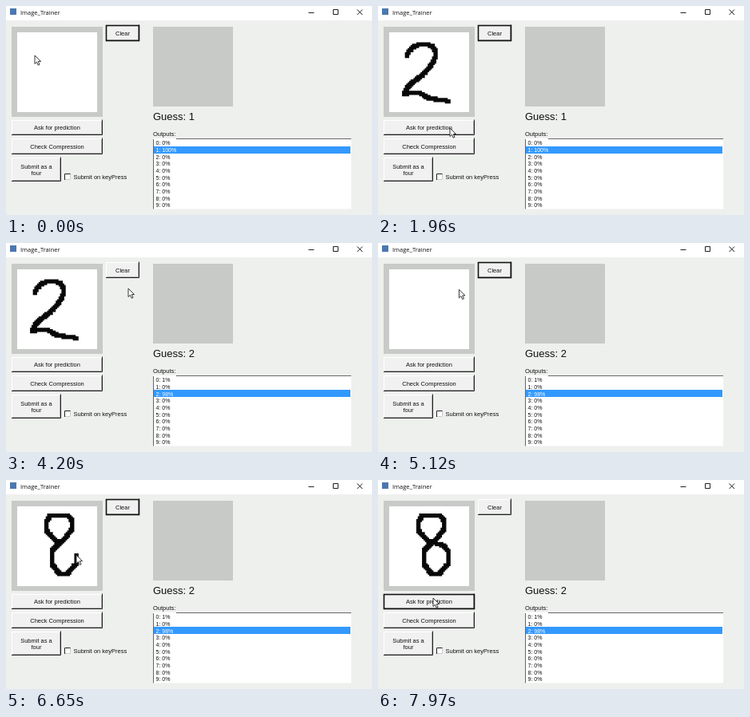
An HTML page that plays this animation: 458x262 px, repeating every 8000 ms.

```html
<!DOCTYPE html>
<html lang="en">
<head>
<meta charset="utf-8">
<title>Image_Trainer</title>
<style>
html, body { margin: 0; width: 100%; height: 100%; overflow: hidden; background: #eef0ee; }
svg { display: block; width: 458px; height: 262px; }
text { font: 7.5px "Liberation Sans", Arial, sans-serif; fill: #111; white-space: pre; }
.title { font-family: "Open Sans", sans-serif; }
.guess { font-size: 13px; }
.row { font-size: 7px; }
.mid { text-anchor: middle; }
.line { fill: none; stroke: #222; }
.focus { fill: none; stroke: #111; stroke-width: 1.6; }
</style>
</head>
<body>
<svg viewBox="0 0 458 262">
  <rect width="458" height="262" fill="#eef0ee"/>
  <rect width="458" height="18" fill="#fff"/>
  <rect x="5" y="3" width="8" height="8" fill="#4b78b0"/>
  <text class="title" x="18" y="11">Image_Trainer</text>
  <path class="line" d="M378.500 8.500h7M409.500 4.500h6v6h-6zM439.500 4.500l6.500 6.500m0-6.500l-6.500 6.500"/>

  <rect x="7" y="26" width="114" height="113" fill="#c8cac8"/>
  <rect x="14" y="33" width="100" height="100" fill="#fff"/>
  <rect x="184" y="26" width="100" height="100" fill="#c8cac8"/>
  <path id="ink" fill="#080808"/>

  <g id="buttons"></g>
  <rect x="73" y="210" width="8" height="8" fill="#fff"/>
  <path class="line" d="M73.500 218v-7.500h7.500"/>
  <path d="M74 217.500h6.500v-7" fill="none" stroke="#ccc"/>
  <text x="84.500" y="217">Submit on keyPress</text>

  <text id="guess" class="guess" x="184" y="143"></text>
  <text x="184" y="162.500">Outputs:</text>
  <rect x="184" y="166" width="248" height="88.500" fill="#fff"/>
  <rect id="pick" x="185" width="246" height="9" fill="#3399ff"/>
  <path d="M213 166.500h219M184.500 167v87.500" fill="none" stroke="#666"/>
  <g id="rows"></g>

  <path id="cursor" d="M0 0v10.500l2.500-2.300 1.700 4 1.800-.800-1.700-3.900h3.300z"
        fill="#fff" stroke="#222" stroke-width=".9"/>
</svg>
<script>
const LOOP = 8000, GLIDE = 380, ROW = 8.65, CELL = 100 / 56;
const PREDICT = 2160, SELECT = 3280, CLEAR = 4600, ASK = 7800;
const $ = id => document.getElementById(id);

function make(tag, attrs, label = '') {
  const el = document.createElementNS('http://www.w3.org/2000/svg', tag);
  for (const k in attrs) el.setAttribute(k, attrs[k]);
  el.textContent = label;
  return el;
}

// Draws a raised button and returns its focus frame.
function button(x, y, w, h, ...lines) {
  const edge = (d, stroke) => make('path', { d, stroke, fill: 'none' });
  const focus = make('rect',
    { x: x + .5, y: y + .5, width: w - 1, height: h - 1, class: 'focus', display: 'none' });
  $('buttons').append(
    make('rect', { x, y, width: w, height: h, fill: '#f0f1f0' }),
    edge(`M${x + .5} ${y + h}v${.5 - h}h${w}`, '#fff'),
    edge(`M${x + 1} ${y + h - 1.5}h${w - 2.5}v${2.5 - h}`, '#aaa'),
    edge(`M${x} ${y + h - .5}h${w - .5}v${-h}`, '#222'),
    ...lines.map((s, i) => make('text',
      { class: 'mid', x: x + w / 2, y: y + h / 2 + 2.5 + (i - (lines.length - 1) / 2) * 8 }, s)),
    focus);
  return focus;
}

const ask = button(7, 143, 114, 19, 'Ask for prediction');
const clear = button(125, 24, 42, 20, 'Clear');
button(7, 166, 114, 20, 'Check Compression');
button(7, 190, 62, 30, 'Submit as a', 'four');

const rows = Array.from({ length: 10 }, (_, i) =>
  make('text', { class: 'row', x: 187.5, y: 174.3 + i * ROW }));
$('rows').append(...rows);

// A handwritten digit: when it is drawn, when it is erased, and its line.
function digit(from, to, gone, d) {
  const path = make('path', { d }), length = path.getTotalLength();
  const drawn = t => length * Math.min(1, Math.max(0, (t - from) / (to - from)));
  return { from, gone, drawn, at: s => path.getPointAtLength(s) };
}
const digits = [
  digit(150, 1640, CLEAR, 'M36 62Q42 48 58 48Q73 49 72 62Q68 77 50 91Q34 102 33 110L52 109L65 116L88 119'),
  digit(5400, 6850, LOOP, 'M64 78L51 64V52L55 45L77 44L82 50V62L75 72L58 88V106L66 117L76 118L88 105V90L82 82L67 78')
];

// Places the pointer glides to: arrival time, x, y.
const stops = [
  [1960, 90, 153], [2880, 225, 180], [SELECT, 218, 188], [4200, 153, 57],
  [CLEAR, 146, 35], [5300, 64, 78], [7350, 65, 138], [7770, 69, 148]
];

function pointer(t) {
  const pen = digits.findLast(d => t >= d.from) || digits[0];
  let { x, y } = pen.at(pen.drawn(t));
  for (const [end, x1, y1] of stops) {
    if (end < pen.from || t < end - GLIDE) continue;
    const u = Math.min(1, (t - end) / GLIDE + 1), e = u * u * (3 - 2 * u);
    x += (x1 - x) * e;
    y += (y1 - y) * e;
  }
  return [x, y];
}

// Stamps a square brush of 3 by 3 cells along each visible line.
function inkPath(t) {
  const snap = (v, o) => (o + Math.round((v - o) / CELL - 1.5) * CELL).toFixed(2);
  const stamps = new Set(), b = 3 * CELL;
  for (const d of digits) {
    if (t < d.from || t >= d.gone) continue;
    for (let s = 0; s <= d.drawn(t); s++) {
      const p = d.at(s);
      stamps.add(`M${snap(p.x, 14)} ${snap(p.y, 33)}h${b}v${b}h${-b}z`);
    }
  }
  return [...stamps].join('');
}

const show = (el, on) => el.setAttribute('display', on ? 'inline' : 'none');

function draw(t) {
  const two = t >= PREDICT;
  const picked = !two ? 1 : t >= SELECT ? 2 : -1;
  const odds = two ? [1, 0, 98] : [0, 100];
  $('guess').textContent = 'Guess: ' + (two ? 2 : 1);
  rows.forEach((r, i) => {
    r.textContent = `${i}: ${odds[i] || 0}%`;
    r.style.fill = i === picked ? '#fff' : '#111';
  });
  show($('pick'), picked > 0);
  $('pick').setAttribute('y', Math.floor(167.5 + picked * ROW));
  show(ask, (two && t < SELECT) || t >= ASK);
  show(clear, !two || (t >= CLEAR && t < ASK));
  $('ink').setAttribute('d', inkPath(t));
  $('cursor').setAttribute('transform', `translate(${pointer(t)})`);
}

const start = performance.now();
function tick() {
  draw((performance.now() - start) % LOOP);
  requestAnimationFrame(tick);
}
tick();
</script>
</body>
</html>
```
